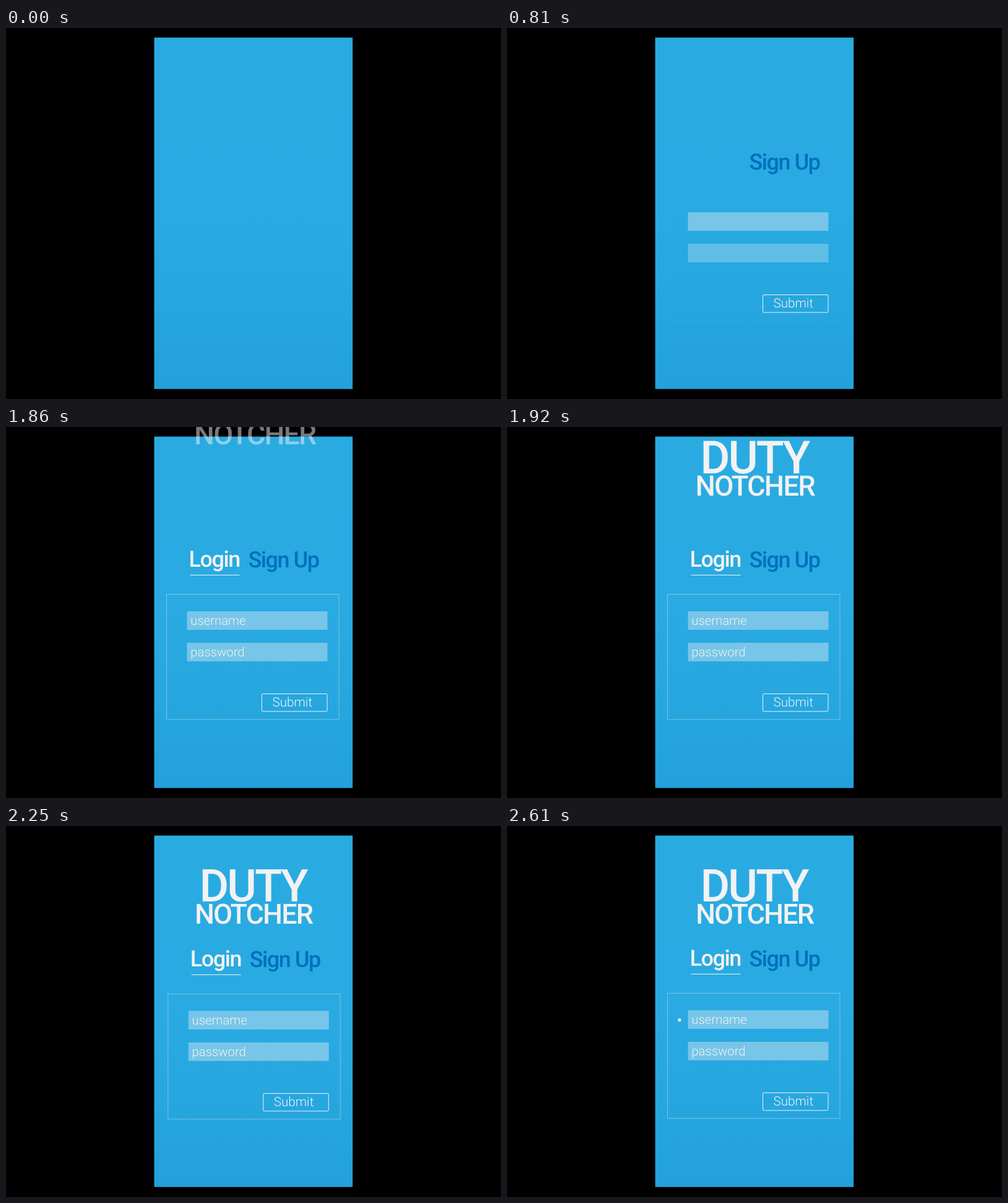
Write an HTML page that moves like this. It is 800x600 px and loops after 3.03 s.

```html
<!DOCTYPE html>
<html lang="en">
<head>
<meta charset="utf-8">
<title>Login screen</title>
<style>
  html, body { margin: 0; width: 100%; height: 100%; overflow: hidden; background: #000; }
  svg { display: block; width: 800px; height: 600px; }
  text { font-family: Roboto, sans-serif; fill: #f2f2f2; text-rendering: geometricPrecision; }
  .bold { font-weight: 500; letter-spacing: -0.04em; }
  .tab { font-size: 36px; }
  .thin { font-weight: 300; font-size: 20.3px; }
  .mid { text-anchor: middle; }
</style>
</head>
<body>
<svg viewBox="0 0 800 600">
  <defs>
    <linearGradient id="sky" x1="0" y1="0" x2="0" y2="1">
      <stop offset="0" stop-color="#29abe2"/>
      <stop offset=".5" stop-color="#29aae2"/>
      <stop offset=".72" stop-color="#27a7e0"/>
      <stop offset="1" stop-color="#22a1dc"/>
    </linearGradient>
  </defs>
  <rect width="800" height="600"/>
  <rect x="239.5" y="15.5" width="320.7" height="568.3" fill="url(#sky)"/>

  <g id="form">
    <g id="login">
      <text class="bold tab" x="295.5" y="226">Login</text>
      <rect x="297.5" y="239" width="80" height="1" fill="#f2f2f2"/>
    </g>
    <text id="signup" class="bold tab" x="391.5" y="227" style="fill:#0071bc">Sign Up</text>
    <rect id="panel" x="259.5" y="270.5" width="278.5" height="202.5" fill="none" stroke="#f2f2f2" stroke-opacity=".4"/>
    <rect id="field1" x="292.5" y="298" width="227" height="30" fill="#f2f2f2" fill-opacity=".39"/>
    <rect id="field2" x="292.5" y="349" width="227" height="30" fill="#f2f2f2" fill-opacity=".39"/>
    <text id="user" class="thin" x="298.3" y="320">username</text>
    <text id="pass" class="thin" x="298.3" y="371">password</text>
    <g id="button">
      <rect x="413.5" y="431.5" width="105.5" height="28.5" rx="1.5" fill="none" stroke="#f2f2f2"/>
      <text class="thin" x="430.4" y="452" style="font-size:20.7px">Submit</text>
    </g>
    <circle id="dot" cx="278.7" cy="313.7" r="0" fill="#f2f2f2"/>
  </g>

  <g id="title">
    <text class="bold mid" x="399" y="122" font-size="73">DUTY</text>
    <text class="bold mid" x="400" y="158" font-size="45">NOTCHER</text>
  </g>
</svg>
<script>
  const LOOP = 3030, STEP = 30;
  const $ = id => document.getElementById(id);
  const ramp = (t, from, to) => Math.min(1, Math.max(0, (t - from) / (to - from)));
  const show = (id, amount) => $(id).setAttribute('opacity', amount);
  const place = (id, value) => $(id).setAttribute('transform', value);

  // fade in, start and end in ms
  const fades = {
    button: [510, 690],
    field1: [570, 780],
    field2: [660, 870],
    signup: [600, 780],
    panel: [780, 1050],
    user: [810, 990],
    pass: [870, 1050],
    login: [810, 1110]
  };

  function rise(id, t, from, to) {
    place(id, `translate(0 ${20 * (1 - ramp(t, from, to)) ** 3})`);
  }

  // the form sways after the title lands
  function sway(t) {
    const x = 2.5 * Math.sin(Math.PI * ramp(t, 1980, 2430)) ** 2;
    const s = ramp(t, 2075, 2610);
    const y = 3 * (1 - s) * Math.sin(2 * Math.PI * s * 535 / 420);
    place('form', `translate(${x} ${y})`);
  }

  function drop(t) {
    const p = ramp(t, 1830, 2010);
    const left = (1 - p) ** 2;
    const size = 1 + 0.043 * left;
    show('title', Math.min(1, p * 3));
    place('title', `translate(${401 + 3 * left} ${158 - 187 * left}) scale(${size}) translate(-401 -158)`);
  }

  function draw(t) {
    for (const id in fades) show(id, ramp(t, ...fades[id]));
    rise('signup', t, 630, 960);
    rise('login', t, 810, 1110);
    sway(t);
    drop(t);
    $('dot').setAttribute('r', 2.6 * ramp(t, 2430, 2610));
  }

  const start = performance.now();
  function tick() {
    const t = (performance.now() - start) % LOOP;
    draw(Math.floor(t / STEP) * STEP);
    requestAnimationFrame(tick);
  }
  draw(0);
  requestAnimationFrame(tick);
</script>
</body>
</html>
```
